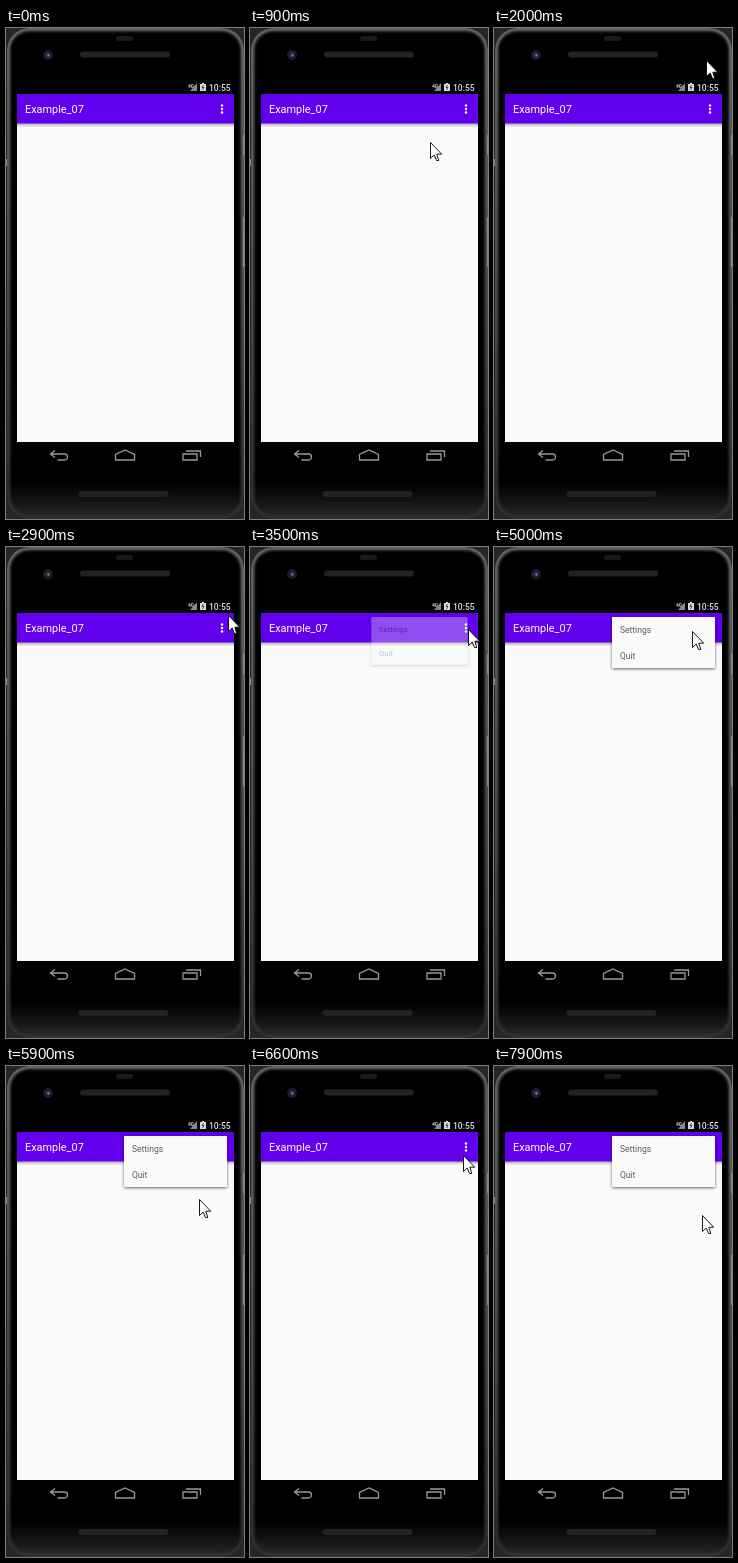
Animation, 238 px wide and 491 px high, one loop 8 s. Source, as an HTML page:

```html
<!DOCTYPE html>
<html lang="en">
<head>
<meta charset="utf-8">
<title>Overflow menu</title>
<style>
  html, body { margin: 0; width: 100%; height: 100%; overflow: hidden; background: #262626; }
  svg { display: block; width: 100vw; height: 100vh; }
  text { font-family: Roboto, sans-serif; }
</style>
</head>
<body>
<svg viewBox="0 0 238 491">
  <defs>
    <linearGradient id="drop" x2="0" y2="1">
      <stop stop-color="#000" stop-opacity=".32"/>
      <stop offset="1" stop-color="#000" stop-opacity="0"/>
    </linearGradient>
    <linearGradient id="chin" x2="0" y2="1">
      <stop stop-color="#222" stop-opacity="0"/>
      <stop offset="1" stop-color="#2c2c2c"/>
    </linearGradient>
    <linearGradient id="rim" x2="0" y2="1">
      <stop stop-color="#777"/>
      <stop offset=".6" stop-color="#555"/>
      <stop offset="1" stop-color="#333"/>
    </linearGradient>
    <filter id="shadow" x="-10%" y="-10%" width="120%" height="130%">
      <feDropShadow dx="0" dy="1" stdDeviation="1.5" flood-opacity=".6"/>
    </filter>
    <filter id="soft"><feGaussianBlur stdDeviation="1.5"/></filter>
    <clipPath id="body"><rect x="1" width="237" height="491" rx="22"/></clipPath>
  </defs>

  <!-- phone body -->
  <rect width="238" height="491" fill="#262626"/>
  <g clip-path="url(#body)">
    <rect width="238" height="491"/>
    <rect y="455" width="238" height="36" fill="url(#chin)"/>
    <rect x="2" y="1" width="235" height="489" rx="21" fill="none"
          stroke="url(#rim)" stroke-width="4" filter="url(#soft)"/>
  </g>
  <path d="M.5 131v7M237.500 107v20M237.500 189v50" stroke="#888"/>
  <rect x="110" y="8" width="17" height="5" rx="2.500" fill="#1a1a1a"/>
  <g fill="#222">
    <rect x="74" y="23.500" width="90" height="6" rx="3"/>
    <rect x="72.500" y="463" width="90" height="6" rx="3"/>
  </g>
  <circle cx="42" cy="27" r="5" fill="#1c1c24"/>
  <circle cx="42" cy="27" r="2.300" fill="#34355c"/>
  <circle cx="42.500" cy="27.500" r=".9" fill="#8a8cb0"/>

  <!-- status bar -->
  <text x="182" y="59.500" font-size="5" font-weight="700" fill="#ccc">4G</text>
  <path d="M191 55v8h-7z" fill="#888"/>
  <path d="M196 55h2v1h2v7h-6v-7h2z" fill="#ddd"/>
  <path d="M197.500 57l-1.500 2.500h2l-1.500 2.500" fill="none" stroke="#222" stroke-width=".8"/>
  <text x="203" y="62.500" font-size="8.500" font-weight="500" fill="#ddd">10:55</text>

  <!-- app -->
  <rect x="11" y="95" width="217" height="319" fill="#fafafa"/>
  <rect x="11" y="95" width="217" height="4.500" fill="url(#drop)"/>
  <rect x="11" y="66" width="217" height="29.500" fill="#6200ee"/>
  <text x="19" y="84.500" font-size="10.900" fill="#fff">Example_07</text>
  <g fill="#fff">
    <circle cx="216" cy="77.500" r="1.200"/>
    <circle cx="216" cy="81" r="1.200"/>
    <circle cx="216" cy="84.500" r="1.200"/>
  </g>

  <!-- navigation bar -->
  <g fill="none" stroke="#999" stroke-width="1.300" transform="translate(0 .5)">
    <path d="M49 422l-4.500 3.500l4.500 3.500M45 425.500h13.500a3 3 0 0 1 0 6h-7"/>
    <path d="M109.500 431.500v-5.500l9.500-4.500l9.500 4.500v5.500z"/>
    <path d="M177 425.500h14v6h-14zM180 422.500h14.500v6"/>
  </g>

  <g id="menu" opacity="0">
    <rect x="118" y="70" width="103" height="51" rx="1" fill="#fafafa" filter="url(#shadow)"/>
    <g font-size="8.500" fill="#5a5a5a">
      <text x="126" y="86">Settings</text>
      <text x="126" y="112">Quit</text>
    </g>
  </g>

  <path id="cursor" d="M.5 .5V16.500L4.200 13L6.500 18.500H8.800L6.800 12.200H11.700Z"
        fill="#fff" stroke="#000" stroke-width=".9"/>
</svg>

<script>
  const LOOP = 8000, STEP = 100;
  const entry = { x: 36, y: 213 };

  // Pointer moves, each easing out from wherever the last one ended
  const moves = [
    { from: 400, to: 1300, x: 216, y: 90 },
    { from: 1900, to: 2100, x: 211, y: 12 },
    { from: 2300, to: 2500, x: 211, y: 103 },
    { from: 2500, to: 2700, x: 228, y: 51 },
    { from: 2800, to: 3100, x: 218, y: 82 },
    { from: 4100, to: 4400, x: 201, y: 152 },
    { from: 4500, to: 5000, x: 198, y: 84 },
    { from: 5400, to: 5900, x: 193, y: 133 },
    { from: 6300, to: 6800, x: 217, y: 81 },
    { from: 7700, to: 7900, x: 208, y: 149 }
  ];

  const menu = document.getElementById('menu');
  const cursor = document.getElementById('cursor');

  const ramp = (t, from, to) => Math.min(1, Math.max(0, (t - from) / (to - from)));
  const easeOut = p => 1 - (1 - p) ** 2;

  function pointerAt(t) {
    let { x, y } = entry;
    for (const move of moves) {
      const p = easeOut(ramp(t, move.from, move.to));
      x += (move.x - x) * p;
      y += (move.y - y) * p;
    }
    return [Math.round(x), Math.round(y)];
  }

  function menuAt(t) {
    const reopening = t >= 7000;
    const opened = reopening ? ramp(t, 7000, 7300) : ramp(t, 3300, 3700);
    const closed = reopening ? 0 : ramp(t, 6100, 6400);
    return { opacity: opened ** 1.7 - closed * (opened > 0), scale: .87 + .13 * opened };
  }

  function draw(t) {
    cursor.setAttribute('visibility', t < 500 ? 'hidden' : 'visible');
    cursor.setAttribute('transform', `translate(${pointerAt(t)})`);

    const { opacity, scale } = menuAt(t);
    menu.setAttribute('opacity', opacity);
    menu.setAttribute('transform', `translate(170 70) scale(${scale}) translate(-170 -70)`);
  }

  const start = performance.now();
  function tick() {
    const t = (performance.now() - start) % LOOP;
    draw(Math.floor(t / STEP) * STEP);
    requestAnimationFrame(tick);
  }
  tick();
</script>
</body>
</html>
```
